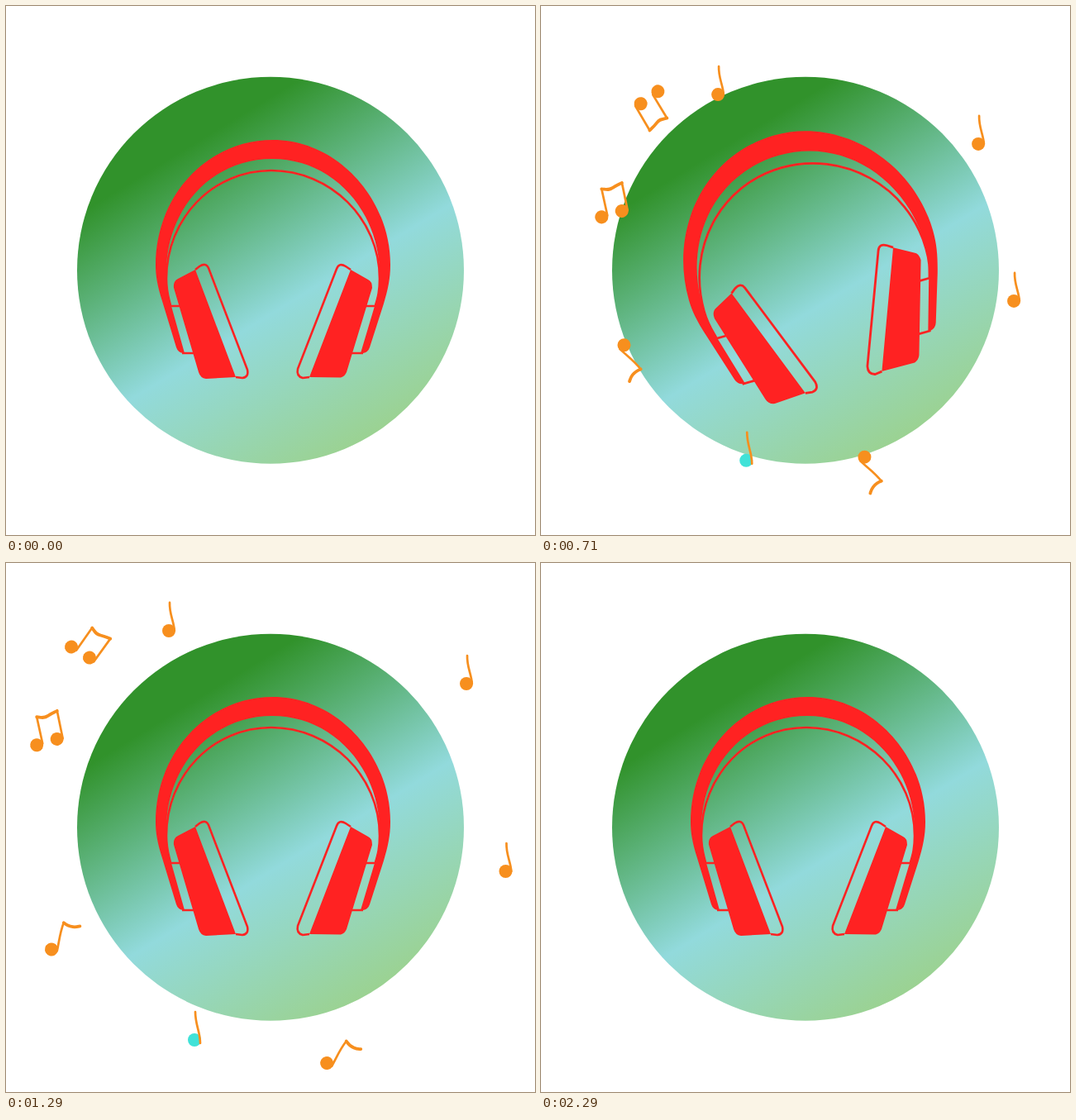
Write an HTML page that moves like this. It is 640 px wide and 640 px high and loops after 2.71 s.

```html
<!DOCTYPE html>
<html lang="en">
<head>
<meta charset="utf-8">
<title>Headphones</title>
<style>
  html, body { margin: 0; width: 100%; height: 100%; overflow: hidden; background: #fff; }
  svg { display: block; width: 100vw; height: 100vh; }
  .line { fill: none; stroke: #ff2222; stroke-width: 2.6; stroke-linejoin: round; }
  .stem { fill: none; stroke: #f78f1e; stroke-width: 2.7; stroke-linecap: round; }
  .beam { fill: none; stroke: #f78f1e; stroke-width: 3.8; stroke-linecap: round; }
</style>
</head>
<body>
<svg viewBox="0 0 640 640">
  <defs>
    <linearGradient id="sky" gradientUnits="userSpaceOnUse" x1="226.8" y1="167" x2="441.7" y2="519.8">
      <stop offset="0" stop-color="#31922b"/>
      <stop offset=".543" stop-color="#92dadc"/>
      <stop offset="1" stop-color="#9bd292"/>
    </linearGradient>
  </defs>
  <circle cx="320" cy="319.8" r="234" fill="url(#sky)"/>
  <g id="phones" fill="#ff2222">
    <path d="M214 420Q208 419 206 413L189 357C183 338 181 326 181 313C181 230 243 162 323 162C401 162 465 233 465 313C465 330 462 343 457 360L440 413Q438 419 432 420L429 420L446 363C451 347 452 340 452 318C448 243 393 185 322 185C250 185 196 243 194 318C194 340 196 350 200 363L216 420Z"/>
    <path class="line" d="M199 362C196 350 194 345 194 330C194 257 250 199 321 199C392 199 452 257 452 330C452 345 450 352 447 362"/>
    <path class="line" d="M197 363H210M213 420H228M448 363H435M432 420H417"/>
    <path d="M229 319L278 449L242 451Q235 450 233 443L203 341Q202 333 208 330Z"/>
    <path class="line" d="M229 319L234 315Q242 310 245 317L292 440Q294 449 286 450L278 449"/>
    <path d="M417 319L367 449L405 449.500Q410 448 412 443L443 341Q443 333 438 331Z"/>
    <path class="line" d="M417 319L411 315Q403 310 400 318L353 439Q351 448 359 450L367 449"/>
  </g>
  <g id="notes"></g>
</svg>
<script>
const LOOP = 2710, FPS = 14;
const clamp = (v, lo = 0, hi = 1) => Math.min(hi, Math.max(lo, v));

// Note drawings, with the first head at 0,0
const head = (x, y, color = '#f78f1e') => `<circle cx="${x}" cy="${y}" r="8" fill="${color}"/>`;
const path = (cls, d) => `<path class="${cls}" d="${d}"/>`;
const art = {
  single: head(0, 0) + path('stem', 'M6.800 0C6 -12 .5 -20 1 -34'),
  cyan: head(0, 0, '#40e2d8') + path('stem', 'M7 4C7 -10 1 -18 1 -34'),
  eighth: head(0, 0) + path('stem', 'M7 0C6.500 -12 4.500 -22 6 -35') +
    path('beam', 'M6 -35C10 -33 14 -32.500 18 -33S24 -35 26 -36'),
  pair: head(0, 0) + head(25.5, -1) + path('stem', 'M7.300 0L8.500 -32M32.500 0L34.200 -34') +
    path('beam', 'M8.500 -33C14 -31 16 -29 22 -31S30 -33 34.200 -34')
};
const pivot = { single: [0, -15], cyan: [0, -15], eighth: [13.4, -17], pair: [19, -15] };

// from/by: path of the pivot; rot: start, turn, lowest angle; seconds for entry and exit
const notes = [
  { kind: 'single', from: [221.5, 103], by: [-31.4, -46.2], enter: .3, leave: 1.43 },
  { kind: 'single', from: [517, 161], by: [51.3, -38.5], enter: .3, leave: 1.43 },
  { kind: 'single', from: [558, 335], by: [59.6, 29.5], enter: .42, leave: 1.61 },
  { kind: 'cyan', from: [257, 523], by: [-37.2, 50], enter: .3, leave: 1.78 },
  { kind: 'eighth', from: [387.6, 554], by: [26.8, 56], rot: [180, 190, 0], enter: .3, leave: 1.665, fade: true },
  { kind: 'eighth', from: [117.2, 421], by: [-56.8, 42.4], rot: [188, 222, -6], bend: .95, enter: .3, leave: 1.63, fade: true },
  { kind: 'pair', from: [149.6, 140.3], by: [-58.1, -51.3], rot: [196, 209, 0], bend: .9, enter: .3, leave: 1.78 },
  { kind: 'pair', from: [106.6, 254.2], by: [-68.5, -66.5], rot: [-14.5, 0, -14.5], bend: .9, enter: .48, leave: 1.714 }
];

const layer = document.getElementById('notes');
for (const n of notes) {
  n.el = document.createElementNS('http://www.w3.org/2000/svg', 'g');
  n.el.innerHTML = art[n.kind];
  layer.append(n.el);
}

// Outward travel: quick at first, then a slow drift
const travel = [[.357, -.62], [.571, 0], [.857, .41], [1.071, .605], [1.286, .78], [1.714, 1], [2.286, 1.2]];
const last = travel.length - 1;
function slope(i) {
  const a = travel[Math.max(0, i - 1)], b = travel[Math.min(last, i + 1)];
  return (b[1] - a[1]) / (b[0] - a[0]);
}
function progress(t) {
  t = clamp(t, travel[0][0], travel[last][0]);
  let i = 0;
  while (i < last - 1 && t > travel[i + 1][0]) i++;
  const [t0, a] = travel[i], [t1, b] = travel[i + 1];
  const d = t1 - t0, u = (t - t0) / d, v = 1 - u;
  return v * v * (1 + 2 * u) * a + u * u * (3 - 2 * u) * b + u * v * d * (v * slope(i) - u * slope(i + 1));
}

function drawNote(n, t, p) {
  const out = clamp((t - n.leave) / .5);
  const alpha = t < .35 ? 0 : clamp((t - n.enter) / .2) * (1 - out * (n.fade ? 1 : .4));
  const size = n.fade ? 1 : 1 - out;
  const visible = alpha > 0 && size > 0;
  n.el.style.display = visible ? '' : 'none';
  if (!visible) return;
  const q = p > 0 ? p ** (n.bend || 1) : p;
  const [start, turn, low] = n.rot || [0, 0, 0];
  const angle = Math.max(low, start - turn * p);
  const [px, py] = pivot[n.kind];
  const x = n.from[0] + n.by[0] * q, y = n.from[1] + n.by[1] * q;
  n.el.setAttribute('opacity', alpha);
  n.el.setAttribute('transform',
    `translate(${x} ${y}) rotate(${angle}) scale(${size}) translate(${-px} ${-py})`);
}

const phones = document.getElementById('phones');
function drawPhones(t) {
  const swing = Math.sin(Math.PI * clamp((t - .286) / .734));
  phones.setAttribute('transform',
    `translate(323.5 301) rotate(${-16.4 * swing}) scale(${1 + .087 * swing * swing}) translate(-323.5 -301)`);
}

function render() {
  const ms = performance.now() % LOOP;
  const t = Math.floor((ms + 5) * FPS / 1000) / FPS;
  const p = progress(t);
  drawPhones(t);
  for (const n of notes) drawNote(n, t, p);
  requestAnimationFrame(render);
}
render();
</script>
</body>
</html>
```
